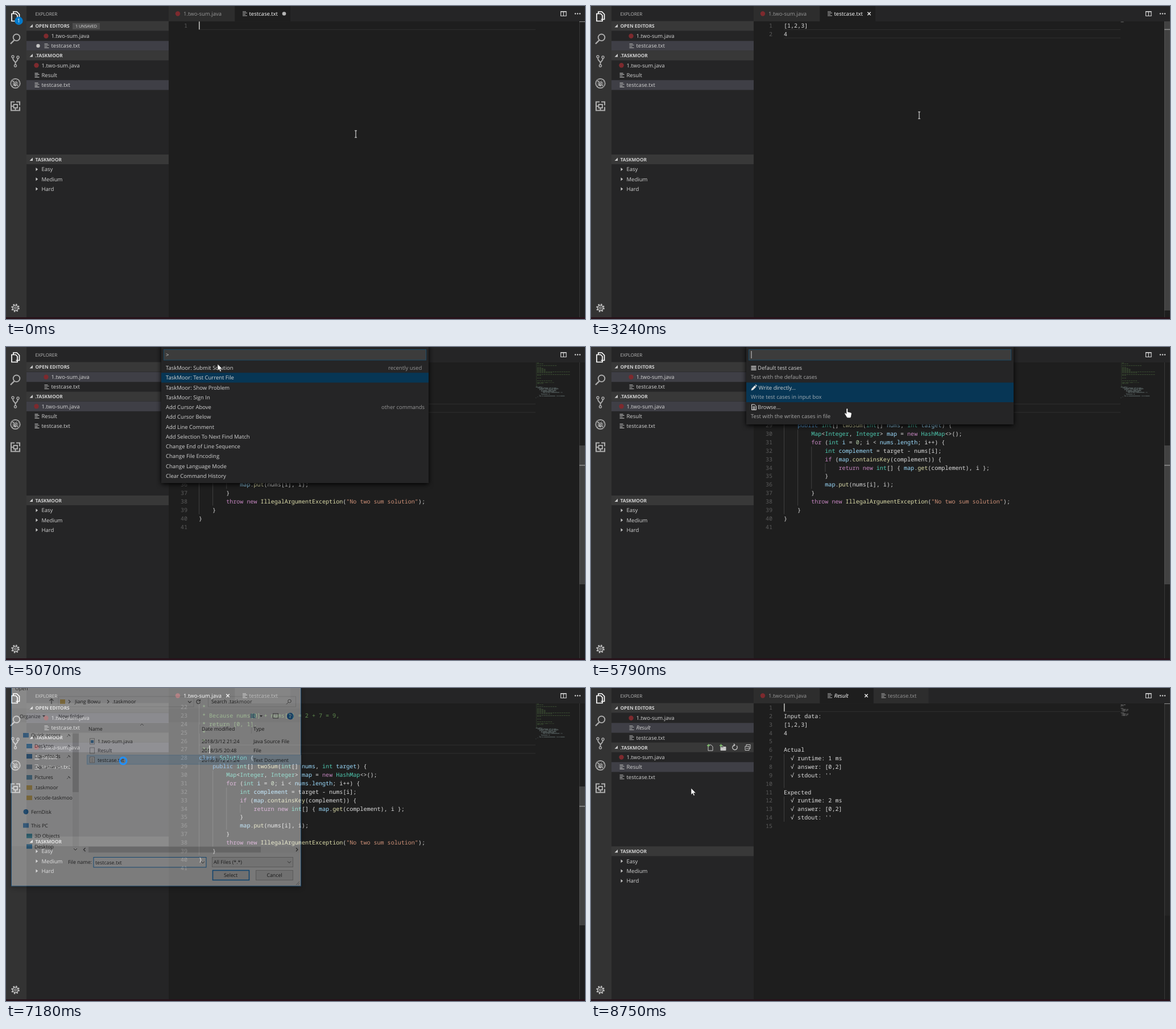
An HTML page that plays this animation: 1018 by 550 pixels, repeating every 8.86 s.

```html
<!DOCTYPE html>
<html lang="en">
<head>
<meta charset="utf-8">
<title>Editor test run</title>
<style>
html, body { margin: 0; width: 100%; height: 100%; overflow: hidden; background: #1e1e1e; }
svg { display: block; width: 100vw; height: 100vh; }
text { font: 9.5px "Open Sans", "Noto Sans", sans-serif; fill: #d2d2d2; white-space: pre; text-rendering: geometricPrecision; }
.code { font: 500 10.05px "Noto Sans Mono", "DejaVu Sans Mono", monospace; fill: #dcdcdc; }
.num { font-weight: 400; fill: #5a5a5a; text-anchor: end; }
.head { font-size: 8.3px; font-weight: 700; }
.small { font-size: 8.07px; fill: #bbb; }
.badge { font-size: 7.1px; fill: #ddd; }
.dim { fill: #969696; }
.detail { fill: #d2d2d2; opacity: .75; }
.lit { fill: #fff; }
.italic { font-style: italic; }
.win { font-size: 8.8px; fill: #111; }
.mid { text-anchor: middle; }
.popup { filter: drop-shadow(0 2px 4px #000); }
.window { filter: drop-shadow(0 3px 5px rgba(0, 0, 0, .6)); }
</style>
</head>
<body>
<svg id="stage" viewBox="0 0 1018 550" preserveAspectRatio="none"></svg>
<script>
const LOOP = 8860, STEP = 100, CHAR = 6.03, PITCH = 14.87, LEFT = 339;

// Markup helpers; y is always the vertical centre of a text line.
const esc = s => s.replace(/&/g, '&amp;').replace(/</g, '&lt;').replace(/>/g, '&gt;');
const on = (spans, ...parts) => `<g data-on="${spans}">${parts.join('')}</g>`;
const rect = (x, y, w, h, fill, more = '') => `<rect x="${x}" y="${y}" width="${w}" height="${h}" fill="${fill}" ${more}/>`;
const text = (x, y, s, cls = '') => `<text x="${x}" y="${y + 3.4}" class="${cls}">${esc(s)}</text>`;
const circle = (x, y, r, fill, more = '') => `<circle cx="${x}" cy="${y}" r="${r}" fill="${fill}" ${more}/>`;
const line = (d, stroke = '#b8b8b8', width = 1, more = '') => `<path d="${d}" fill="none" stroke="${stroke}" stroke-width="${width}" ${more}/>`;
const shape = (d, fill, more = '') => `<path d="${d}" fill="${fill}" ${more}/>`;
const at = (x, y, s) => `<g transform="translate(${x} ${y})">${s}</g>`;

const textIcon = (x, y) => line(`M${x} ${y - 3.5}h6M${x} ${y - 1.2}h8M${x} ${y + 1.2}h5M${x} ${y + 3.5}h8`, '#b0b0b0', 1.1);
const javaIcon = (x, y) => circle(x, y, 4.2, '#7d2a2e');
const fileIcon = (name, x, y) => name.endsWith('.java') ? javaIcon(x + 3, y) : textIcon(x, y);
const cross = (x, y) => line(`M${x - 2.7} ${y - 2.7}l5.4 5.4m0 -5.4l-5.4 5.4`, '#e8e8e8', 1.5);

// Sidebar
const header = (y, s) => rect(36, y - 8.5, 250, 17, '#383838') +
  shape(`M47 ${y - 3}v5.5h-5.5z`, '#ccc') + text(51.5, y, s, 'head');
const entry = (y, name, x, cls) => fileIcon(name, x - 12, y) + text(x, y, name, cls);
const selected = y => rect(36, y - 8.6, 250, 17.2, '#3f3f46');
const folder = (y, s) => shape(`M52.5 ${y - 3}l3.6 3l-3.6 3z`, '#c5c5c5') + text(62.5, y, s);
const tree = () => header(87, '.TASKMOOR') + entry(104.3, '1.two-sum.java', 62.5) +
  entry(121.6, 'Result', 62.5) + entry(138.9, 'testcase.txt', 62.5) +
  header(269.5, 'TASKMOOR') + folder(287, 'Easy') + folder(304.3, 'Medium') + folder(321.6, 'Hard');

const treeTools = line('M206 100h5l3 3v7h-8zM228 102h4l1 1.500h4v6h-9z', '#c5c5c5') +
  shape('M228 104h9v5h-9z', '#c5c5c5') + line('M204 101h5m-2.500 -2.500v5M226 101h5m-2.500 -2.500v5', '#7ec36b', 1.3) +
  line('M256 101.500a4.200 4.200 0 1 1 -4 -1.200M251 98l2 2.300l-2.500 2', '#c5c5c5', 1.3) +
  line('M271 102.500h7v7h-7zM273 102v-2.500h7v7h-2M272.500 106h4', '#c5c5c5');

const sidebar = rect(36, 0, 250, 550, '#252526') + text(51.5, 13.7, 'EXPLORER', 'small') +
  on('0-3950', selected(70)) + on('3950-7810', selected(52.7)) + on('7810-8860', selected(70)) +
  on('0-4440', selected(138.9)) + on('4440-7920', selected(104.3)) + on('7920-8860', selected(138.9)) +
  header(35, 'OPEN EDITORS') + entry(52.7, '1.two-sum.java', 79.5) +
  on('0-3010', rect(117, 30, 48, 11, '#4d4d4d'), text(122, 35, '1 UNSAVED', 'badge'), circle(56.5, 70, 3.2, '#c5c5c5')) +
  on('0-7810', entry(70, 'testcase.txt', 79.5), tree()) +
  on('7810-8860', entry(70, 'Result', 79.5, 'italic'), entry(87.3, 'testcase.txt', 79.5), at(0, 17.3, tree()), treeTools);

// Activity bar
const ring = (x, y, r, stroke, width, more = '') => circle(x, y, r, 'none', `stroke="${stroke}" stroke-width="${width}" ${more}`);
const activity = rect(0, 0, 36, 550, '#333') +
  line('M13 13v-3h6l4.500 4.500v9h-6M10 13.500h7l3 3v10h-10z', '#fff', 1.7) +
  line('M14.500 60l-6.500 6.500', '#adadad', 2.4) + ring(18.5, 55.3, 5.8, '#adadad', 1.9) +
  line('M12 91.500c0 5 4 5 4.500 8v4M21 92c0 5 -4 5 -4.500 8', '#adadad', 1.8) +
  [[12, 89], [21, 90], [16.5, 105]].map(([x, y]) => circle(x, y, 2, '#333', 'stroke="#adadad" stroke-width="1.400"')).join('') +
  ring(16.5, 136, 8.2, '#adadad', 1.7) +
  `<ellipse cx="16.500" cy="137" rx="3.200" ry="4.200" fill="#adadad"/>` +
  line('M11 133l11 7M11 137h11M11 141l11 -8M14 131l1.500 2M19 131l-1.500 2', '#adadad') +
  line('M11 130l11.500 12', '#333', 2.6) + line('M10.700 130.200l11.600 11.600', '#adadad', 1.5) +
  line('M15 168.500h-6v15h15v-6M18 168.500h6v6M9 176h4M16.500 183v-4', '#adadad', 2.1) +
  line('M13.500 173h6.500v6h-6.500z', '#adadad', 1.9) +
  ring(16.5, 530.5, 6.2, '#c5c5c5', 2.2, 'stroke-dasharray="2.435"') +
  ring(16.5, 530.5, 4.6, '#c5c5c5', 1.5) + ring(16.5, 530.5, 1.8, '#c5c5c5', 1.1) +
  on('0-3010', circle(22.5, 26, 7.2, '#007acc'), text(22.5, 26, '1', 'lit mid'));

// Tabs
const tab = (x, w, name, active, cls = '') => rect(x, 0, w, 27, active ? '#1e1e1e' : '#2d2d2d') +
  fileIcon(name, x + (name.endsWith('.java') ? 13 : 13.5), 13.5) +
  text(x + (name.endsWith('.java') ? 26 : 25), 13.5, name, (active ? 'lit ' : 'dim ') + cls);
const tabs = rect(286, 0, 732, 27, '#252526') +
  on('0-3950', tab(286, 116, '1.two-sum.java'), tab(402.5, 97.5, 'testcase.txt', true)) +
  on('0-3010', circle(489, 13.5, 3.3, '#b5b5b5')) + on('3010-3950', cross(489, 13.5)) +
  on('3950-7810', tab(286, 116, '1.two-sum.java', true), cross(390, 13.5), tab(402.5, 97.5, 'testcase.txt')) +
  on('7810-8860', tab(286, 116, '1.two-sum.java'), tab(402.5, 94, 'Result', true, 'italic'),
    cross(484, 13.5), tab(497, 96.5, 'testcase.txt')) +
  line('M975.500 9.500h9.500v8h-9.500zM980.300 9v8M975 10.200h10', '#d0d0d0', 1.2) +
  [1001, 1005, 1009].map(x => circle(x, 13.5, 1.2, '#d0d0d0')).join('');

// Editor
const TOKENS = /("[^"]*")|\b(class|public)\b|\b(for|if|return|throw|new)\b|\b(int|Map|Integer|HashMap|Solution)\b|(\w+)(?=\()|\b(\d+)\b|\b(nums(?=[,.])|map(?=\.| =)|(?:i|complement)(?= =)|target(?=\) )|length)\b/g;
const INKS = ['#ce9178', '#569cd6', '#c586c0', '#4ec9b0', '#dcdcaa', '#b5cea8', '#9cdcfe'];
const GREEN = '#608b4e';
const ink = (s, color) => `<tspan fill="${color}">${s}</tspan>`;
const paint = s => /^ \*/.test(s) ? ink(s, GREEN) :
  esc(s).replace(TOKENS, (m, ...g) => ink(m, INKS[g.findIndex(v => v !== undefined)]));

const codeLine = (y, s, tint) => `<text x="${LEFT}" y="${y + 3.6}" class="code">${tint ? paint(s) : esc(s)}</text>`;
const lineNumber = (y, n) => `<text x="319" y="${y + 3.6}" class="code num">${n}</text>`;
const codeBlock = (lines, first, top, tint) => lines.map((s, i) =>
  codeLine(top + i * PITCH, s, tint) + lineNumber(top + i * PITCH, first + i)).join('');
const guide = (top, col, from, to) => line(`M${LEFT + col * CHAR + .5} ${top + from * PITCH - 7.4}V${top + to * PITCH + 7.4}`, '#404040');
const currentLine = y => line(`M${LEFT} ${y - 7.7}H931M${LEFT} ${y + 7}H931`, '#303030');
const caret = (col, y) => rect(LEFT + col * CHAR, y - 7, 1.6, 14, '#c0c0bd');
const bracket = col => rect(LEFT + col * CHAR + .8, 27.8, 5.6, 13, 'rgba(0,100,0,.15)', 'stroke="#808080" stroke-width=".8"');
const slider = (y, end, alpha = .4) => rect(1008, y, 10, end - y, `rgba(121,121,121,${alpha})`);
const mark = y => rect(1008, y, 10, 1.6, '#8c8c8c');

const minimap = (lines, color) => lines.map((s, i) => {
  const runs = [...s.matchAll(/\S+/g)].map(m => `M${931.5 + m.index * .78} ${28 + i * 1.57}h${m[0].length * .72}`);
  return line(runs.join(''), color(s), .9, 'opacity=".5"');
}).join('');
const plain = () => '#c8c8c8';

const solution = ` *
 * Because nums[0] + nums[1] = 2 + 7 = 9,
 * return [0, 1].
 *
 *
 */
class Solution {
    public int[] twoSum(int[] nums, int target) {
        Map<Integer, Integer> map = new HashMap<>();
        for (int i = 0; i < nums.length; i++) {
            int complement = target - nums[i];
            if (map.containsKey(complement)) {
                return new int[] { map.get(complement), i };
            }
            map.put(nums[i], i);
        }
        throw new IllegalArgumentException("No two sum solution");
    }
}
`.split('\n');
const preamble = [1, 3, 0, 9, 0, 2, 3, 4, 4, 4, 15, 7, 0, 15, 2, 0, 0, 2, 0, 0, 7]
  .map(n => ' * ' + 'abcd '.repeat(n));

const run = ms => [`  √ runtime: ${ms} ms`, '  √ answer: [0,2]', "  √ stdout: ''", ''];
const result = ['', 'Input data:', '[1,2,3]', '4', '', 'Actual', ...run(1), 'Expected', ...run(2)];

const TOP = 34.3, CODE_TOP = 33.5, SECOND = TOP + PITCH, COMMENT_END = CODE_TOP + 5 * PITCH;
const typing = [[0, ''], [210, '[]'], [960, '[1]'], [1190, '[1,]'], [1290, '[1,2]'], [1400, '[1,2,]'], [1500, '[1,2,3]']];
const typed = typing.map(([start, s], i) => {
  const end = typing[i + 1]?.[0] ?? 4340, close = s.length - 1;
  const caretEnd = start === 210 ? 650 : Math.min(end, 1940);
  return on(`${start}-${end}`, s && on(`${start}-2250`, bracket(0), bracket(close)), codeLine(TOP, s),
    minimap([s], plain), on(`${start}-${caretEnd}`, caret(Math.max(0, close), TOP)));
}).join('');

const testcase = on('0-4340',
  on('0-2250', currentLine(TOP), mark(26.5)), lineNumber(TOP, 1), typed,
  on('210-2250', rect(1011, 28, 4.5, 13, '#8c8c8c')),
  on('1940-2250', caret(7, TOP)),
  on('2250-4340', currentLine(SECOND), lineNumber(SECOND, 2), slider(27, 535), mark(40.5)),
  on('2250-2480', caret(0, SECOND)),
  on('2480-4340', codeLine(SECOND, '4')),
  on('2480-3010,3520-3840', caret(1, SECOND)));

const program = on('4340-7810', currentLine(COMMENT_END),
  guide(CODE_TOP, 0, 0, 5), guide(CODE_TOP, 0, 7, 17), guide(CODE_TOP, 4, 8, 16), guide(CODE_TOP, 8, 10, 14), guide(CODE_TOP, 12, 12, 12),
  codeBlock(solution, 22, CODE_TOP, true),
  minimap([...preamble, ...solution], s => /^ \*/.test(s) ? GREEN : '#a9c4c4'),
  slider(173, 417), mark(207), on('4340-4650,7180-7600', caret(3, COMMENT_END)));

const output = on('7810-8860', currentLine(TOP), guide(TOP, 0, 6, 9), guide(TOP, 0, 11, 13),
  codeBlock(result, 1, TOP), minimap(result, plain), mark(26.5),
  on('7810-8650', slider(27, 400)), on('8650-8750', slider(27, 400, .25)), on('8750-8860', slider(27, 400, .07)),
  on('7810-8230,8650-8860', caret(0, TOP)));

const editor = rect(286, 27, 732, 523, '#1e1e1e') + line('M1008.500 27V547', '#383838') + testcase + program + output;

// Quick input
const popup = (height, body) => `<g class="popup">${rect(273, -4, 470, height + 4, '#252526')}</g>` +
  rect(277.5, 4.5, 461, 18.5, '#3c3c3c', 'stroke="#1b4a66"') + body;
const highlight = (y, h) => rect(273, y, 470, h, '#073655');
const inputCaret = x => rect(x, 7, 1, 13, '#d0d0d0');

const ROW = 17.27;
const commands = ['TaskMoor: Submit Solution', 'TaskMoor: Test Current File', 'TaskMoor: Show Problem', 'TaskMoor: Sign In',
  'Add Cursor Above', 'Add Cursor Below', 'Add Line Comment', 'Add Selection To Next Find Match',
  'Change End of Line Sequence', 'Change File Encoding', 'Change Language Mode', 'Clear Command History'];
const palette = on('4650-5390', popup(239,
  on('4650-5070', highlight(28, ROW)) + on('5070-5390', highlight(28 + ROW, ROW)) +
  text(281, 13.5, '>') + on('4650-4860', inputCaret(288)) +
  commands.map((s, i) => text(281, 36.6 + i * ROW, s)).join('') +
  text(672, 36.6, 'recently used', 'dim') + text(660, 36.6 + 4 * ROW, 'other commands', 'dim')));

const option = (i, label, detail, x) => text(x, 37 + i * 34.5, label) + text(281, 52.8 + i * 34.5, detail, 'detail');
const picker = on('5490-6330', popup(136,
  on('5490-5690', highlight(28, 34.5)) + on('5690-5900', highlight(62.5, 34.5)) + on('5900-6330', highlight(97, 34.5)) +
  inputCaret(281.5) +
  line('M281.500 34h9M281.500 37h9M281.500 40h9', '#e0e0e0', 1.4) + option(0, 'Default test cases', 'Test with the default cases', 293) +
  shape('M281.500 76.500l1 -3.500l5.500 -5.500l2.500 2.500l-5.500 5.500zM288.700 66.800l1 -1l2.500 2.500l-1 1z', '#e0e0e0') +
  option(1, 'Write directly...', 'Write test cases in input box', 294.5) +
  line('M282.500 101h5l3 3v6.500h-8zM284 105h5M284 107h5M284 109h5', '#e0e0e0') + option(2, 'Browse...', 'Test with the writen cases in file', 293)));

// File dialog
const files = [['1.two-sum.java', '2018/3/12 21:24', 'Java Source File'], ['Result', '2018/3/5 20:48', 'File'],
  ['testcase.txt', '2018/3/12 21:24', 'Text Document']];
const places = [['Quick access', 83, 44, '#3b8ed8'], ['Desktop', 102, 50, '#2d8fd0'], ['Downloads', 120, 50, '#2d7cc0'],
  ['Documents', 138.5, 50, '#7b9bb5'], ['Pictures', 157, 50, '#5a9fc8'], ['.taskmoor', 175, 50, '#e8bd55'],
  ['vscode-taskmoor', 193, 50, '#e8bd55'], ['FernDisk', 217.5, 44, '#0f6cbd'], ['This PC', 241.5, 44, '#3b8ed8'],
  ['3D Objects', 260, 50, '#35a0c0'], ['Desktop', 278.5, 50, '#2d8fd0']];
const frame = (x, y, w, h, fill, stroke, width = 1) => rect(x, y, w, h, fill, `stroke="${stroke}" stroke-width="${width}"`);
const label = (x, y, s) => text(x, y, s, 'win');
const placeIcon = (name, x, y, fill) => name === 'FernDisk' ? circle(x - 9, y, 4.5, fill) : rect(x - 14, y - 4, 10, 8, fill);

const dialog = () => `<g class="window">${frame(9.5, -40, 509, 388, '#f4f4f4', '#1883d7')}</g>` +
  rect(10, -40, 508, 76, '#fff') + rect(10, 60, 508, 218, '#fff') + label(16, .5, 'Open') +
  frame(92, 15, 238, 18, '#fff', '#d9d9d9') + frame(355.5, 15, 154, 18, '#fff', '#d9d9d9') +
  line('M80 28v-9m-3.500 3.500l3.500 -3.500l3.500 3.500', '#555', 1.3) + rect(95, 20, 9, 8, '#e8bd55') +
  line('M110 21l3 3l-3 3M178 21l3 3l-3 3M320 23l3 3l3 -3', '#555', 1.2) +
  line('M341 22.500a3.300 3.300 0 1 0 .4 2.500M341.500 20v3h-3', '#555', 1.2) +
  label(121, 24, 'Jiang Bowu') + label(187, 24, '.taskmoor') + label(361, 24, 'Search .taskmoor') +
  ring(498.5, 23, 2.8, '#555', 1) + line('M496.500 25l-3.500 3.500', '#555') +
  label(24, 49.5, 'Organize') + shape('M64 48h5l-2.500 3z', '#333') + label(92, 49.5, 'New folder') +
  rect(430, 45, 9, 8, '#6fa3c8') + shape('M446 48h5l-2.500 3z', '#333') + frame(469.5, 45, 9, 8, '#fff', '#555') +
  circle(500, 49.5, 6, '#0b67c2') + text(500, 49.5, '?', 'lit mid') +
  line('M236 66l3 -3l3 3', '#777') + label(145, 72, 'Name') + label(344, 72, 'Date modified') + label(435, 72, 'Type') +
  line('M340.500 64v16M431.500 64v16', '#ddd') +
  places.map(([s, y, x, fill]) => placeIcon(s, x, y, fill) + label(x, y, s)).join('') +
  [83, 102, 120, 138.5, 157].map(y => line(`M107 ${y + 3}l3 -3m-1 -2l4 4m-3 -4l3 3`, '#777')).join('') +
  rect(117, 78, 11, 202, '#eee') + rect(117, 80, 11, 103, '#c8c8c8') + line('M119 282l3 3l3 -3', '#333') +
  on('6850-7280', frame(142.5, 118, 376, 16, '#cce8ff', '#99d1ff')) +
  files.map(([name, date, type], i) => {
    const y = 93.7 + i * 16.2;
    return frame(147.5, y - 5, 8, 10, '#fff', '#999') + (i === 0 ? rect(149, y - 2, 5, 5, '#2477b8') :
      i === 2 ? line(`M149.500 ${y - 2}h4m-4 2.500h4m-4 2.500h4`, '#777', .8) : '') +
      label(161, y, name) + label(344, y, date) + label(435, y, type);
  }).join('') +
  rect(134, 278.5, 384, 11, '#eee') + rect(145, 279, 303, 10, '#c8c8c8') + line('M139.500 281l-3 3l3 3M510 281l3 3l-3 3', '#333', 1.2) +
  label(109, 306, 'File name:') + frame(154, 297.5, 198, 17.5, '#fff', '#0078d7') + on('6850-7280', label(157, 306.5, 'testcase.txt')) +
  frame(362.5, 297.5, 142, 17, '#e6e6e6', '#aaa') + label(365, 306, 'All Files (*.*)') +
  line('M343 305l3 3l3 -3M495 304.500l3 3l3 -3', '#444') +
  frame(363.5, 320.5, 64, 17, '#e1e1e1', '#0078d7', 1.6) + text(395, 329, 'Select', 'win mid') +
  frame(439.5, 320.5, 65, 17, '#e1e1e1', '#adadad') + text(472, 329, 'Cancel', 'win mid') +
  line('M510 346l6 -6M513 346l3 -3', '#999');

const fileDialog = on('6650-6750,7180-7280', `<g opacity=".42">${dialog()}</g>`) +
  on('6750-7180', `<g transform="translate(264 150) scale(1.03) translate(-264 -150)">${dialog()}</g>`);

// Pointer
const OUTLINE = 'stroke="#222" stroke-width=".6"';
const arrow = shape('M0 0V11.500L2.700 9L4.500 13.200L6.400 12.400L4.600 8.400H8.300Z', '#fff', OUTLINE);
const hand = shape('M-1 1.500c0 -2 2.500 -2 2.500 0v4.500l5 1.200c1.500 .4 1.800 1.200 1.600 2.800l-.8 4c-.3 2 -1 2.500 -2.500 2.500h-3c-1.500 0 -2 -.7 -2.700 -2l-3 -5c-.6 -1.300 .8 -2.200 1.800 -1.200l1.100 1.200z', '#fff', OUTLINE);
const pointer = `<g id="pointer">` +
  on('0-3650', line('M-2 -6h1.500l.5 .5l.5 -.5h1.500M0 -5.500v11M-2 6h1.500l.5 -.5l.5 .5h1.500', '#e0e0e0', 1.1)) +
  on('3650-5590,6330-7180,7600-8860', arrow) + on('5590-6330', hand) +
  on('7180-7600', ring(4, 6, 6, '#1e90ff', 3)) + '</g>';

const stage = document.getElementById('stage');
stage.innerHTML = activity + sidebar + editor + tabs + rect(0, 547, 1018, 3, '#27121a') + palette + picker + fileDialog + pointer;

const timed = [...stage.querySelectorAll('[data-on]')].map(el =>
  ({ el, spans: el.dataset.on.split(',').map(s => s.split('-').map(Number)) }));
const pointerNode = document.getElementById('pointer');

// Each move: start, end, x, y. The pointer advances in coarse steps.
const moves = [[3010, 3840, 372, 14], [4240, 4240, 372, 30], [5490, 5790, 450, 108], [6650, 6850, 202, 122], [7600, 7600, 176, 176]];
function pointerAt(t) {
  let x = 615, y = 225;
  for (const [start, end, toX, toY] of moves) {
    if (t < start) break;
    const steps = Math.floor((end - start) / STEP);
    const k = steps ? Math.min(1, Math.floor((t - start) / STEP) / steps) : 1;
    const eased = k * k * (3 - 2 * k);
    x += (toX - x) * eased;
    y += (toY - y) * eased;
  }
  return [x, y];
}

function render(now) {
  const t = now % LOOP;
  for (const { el, spans } of timed)
    el.style.display = spans.some(([a, b]) => t >= a && t < b) ? '' : 'none';
  pointerNode.setAttribute('transform', `translate(${pointerAt(t)})`);
}
function tick() {
  render(performance.now());
  requestAnimationFrame(tick);
}
tick();
</script>
</body>
</html>
```
